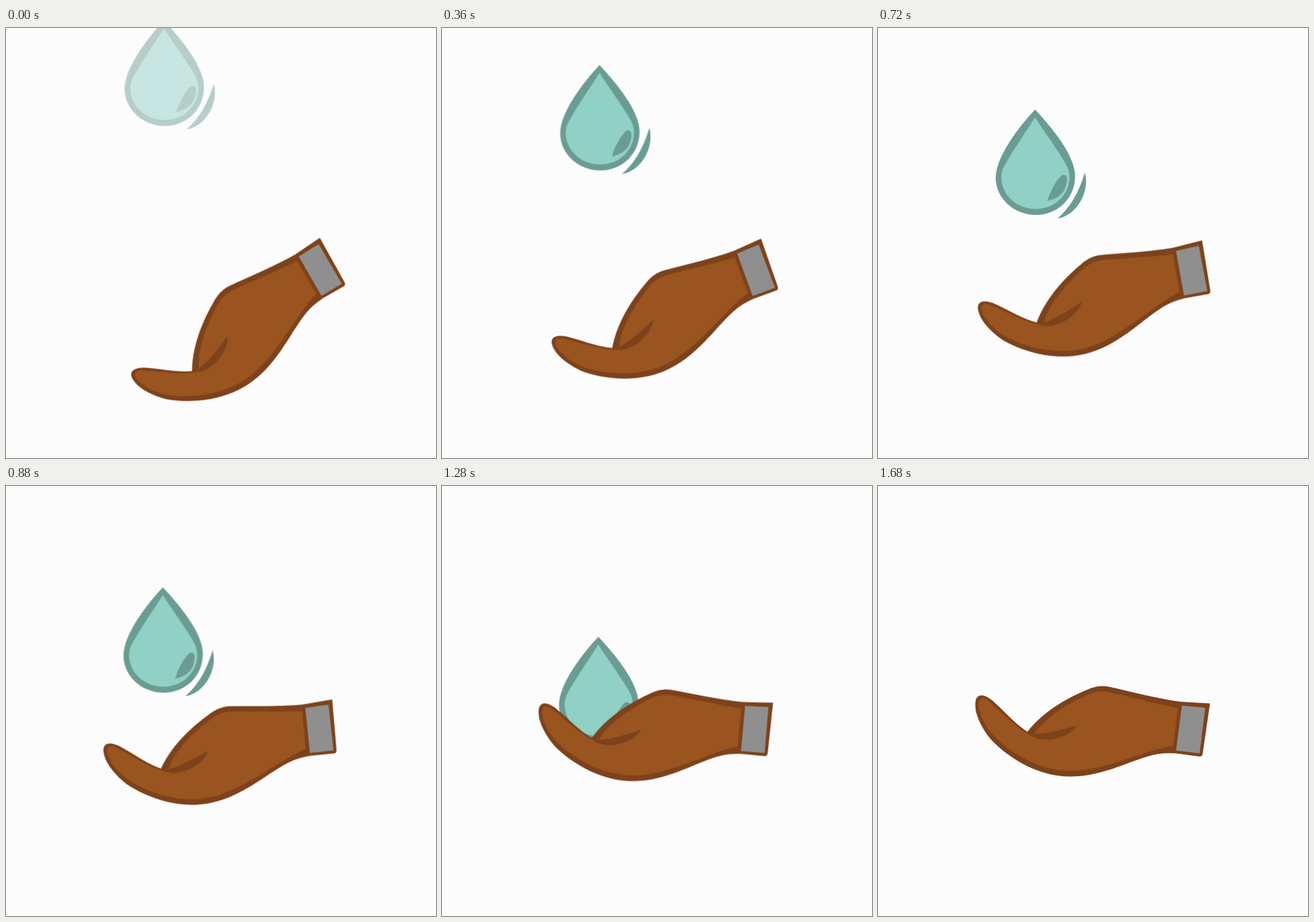
These frames come from a looping animation (612 px wide and 612 px high, 2 s). An HTML page:

```html
<!DOCTYPE html>
<html lang="en">
<head>
<meta charset="utf-8">
<title>Drop and hand</title>
<style>
  html, body { margin: 0; height: 100%; overflow: hidden; background: #fcfcfc; }
  svg { display: block; width: 100vw; height: 100vh; }
  .skin { fill: #99541f; }
  .skin-edge { fill: #7d421b; }
  .cuff { fill: #8f8f8f; }
  .water { fill: #90d0c5; }
  .water-edge { fill: #6b9c94; }

  .hand {
    transform-origin: 443.5px 342.2px;
    animation: turn 2s infinite;
  }
  .drop { animation: fall 2s infinite, fade 2s infinite; }

  /* motion advances every 40 ms */
  @keyframes turn {
    0% { transform: rotate(-37.4deg); animation-timing-function: steps(34); }
    68%, 100% { transform: rotate(0deg); }
  }
  @keyframes fall {
    0% { transform: translate(1.3px, -91.6px); animation-timing-function: steps(34); }
    68%, 100% { transform: translate(-1.2px, 147.6px); }
  }
  @keyframes fade {
    0% { opacity: .48; animation-timing-function: steps(8); }
    16% { opacity: 1; }
    68% { opacity: 1; animation-timing-function: steps(8); }
    84%, 100% { opacity: 0; }
  }
</style>
</head>
<body>
<svg viewBox="0 0 612 612">
  <g class="drop">
    <path class="water-edge" d="M223.5 81 C247 106 280.5 146 280.500 176 C280.500 207 256 231 224.5 231 C193 231 167.500 207 167.500 178 C167.500 148 201 105 223.500 81Z"/>
    <path class="water" d="M223.5 92 C236 112 255 137 267 158 C271 165 272.500 171 272.500 177 C272.500 203 251 222.500 224.500 222.500 C197 222.500 175.500 202 175.500 178 C175.500 171 177 166 180 161 C192 139 211 112 223.500 92Z"/>
    <path class="water-edge" d="M241 211 C245 198 252 185 259 177 C263 172 269 173 269 180 C268 198 259 207 241 211Z"/>
    <path class="water-edge" d="M294.500 170.500 C302 198 283 232 255.500 236 C275 219 286 198 294.500 170.500Z"/>
  </g>
  <g class="hand">
    <path class="skin-edge" d="M472.500 309.500 L462 381.500 Q461 385.500 457.500 385 L424 380.500 Q409 379.500 398 381.500 C359 389 324 413.500 273 413.500 C228 413.500 185 387 160 360 C148 345 138.500 326 138.500 313 C138 302 142 298 147 298 C154 298 162 304 169 311 C183 324 196 339 212.700 349.700 C233 324 264 303 303 287.700 Q316 283 330 286 C362 293 400 303 430 307Z"/>
    <path class="skin" d="M427 316 L420 369.500 C377 377 323 405.500 273 405.500 C231 405.500 189 381 164 355 C151 340 142.500 322 143.500 309 C144.500 301 151 301 156 305 C173 319 194 342 213 352.300 L223 352 C239 329 268 310 304 295 Q316 291 329 293.500 C362 301 396 310 427 316Z"/>
    <path class="skin-edge" d="M212.700 349.700 L223 353 C245 352 264 346 283 341 C273 357 245 365 225 359 Q217 356 211 350.500Z"/>
    <path class="cuff" d="M432.500 312.500 L465.700 315.500 L457.800 380.500 L424.200 376.500Z"/>
  </g>
</svg>
</body>
</html>
```
